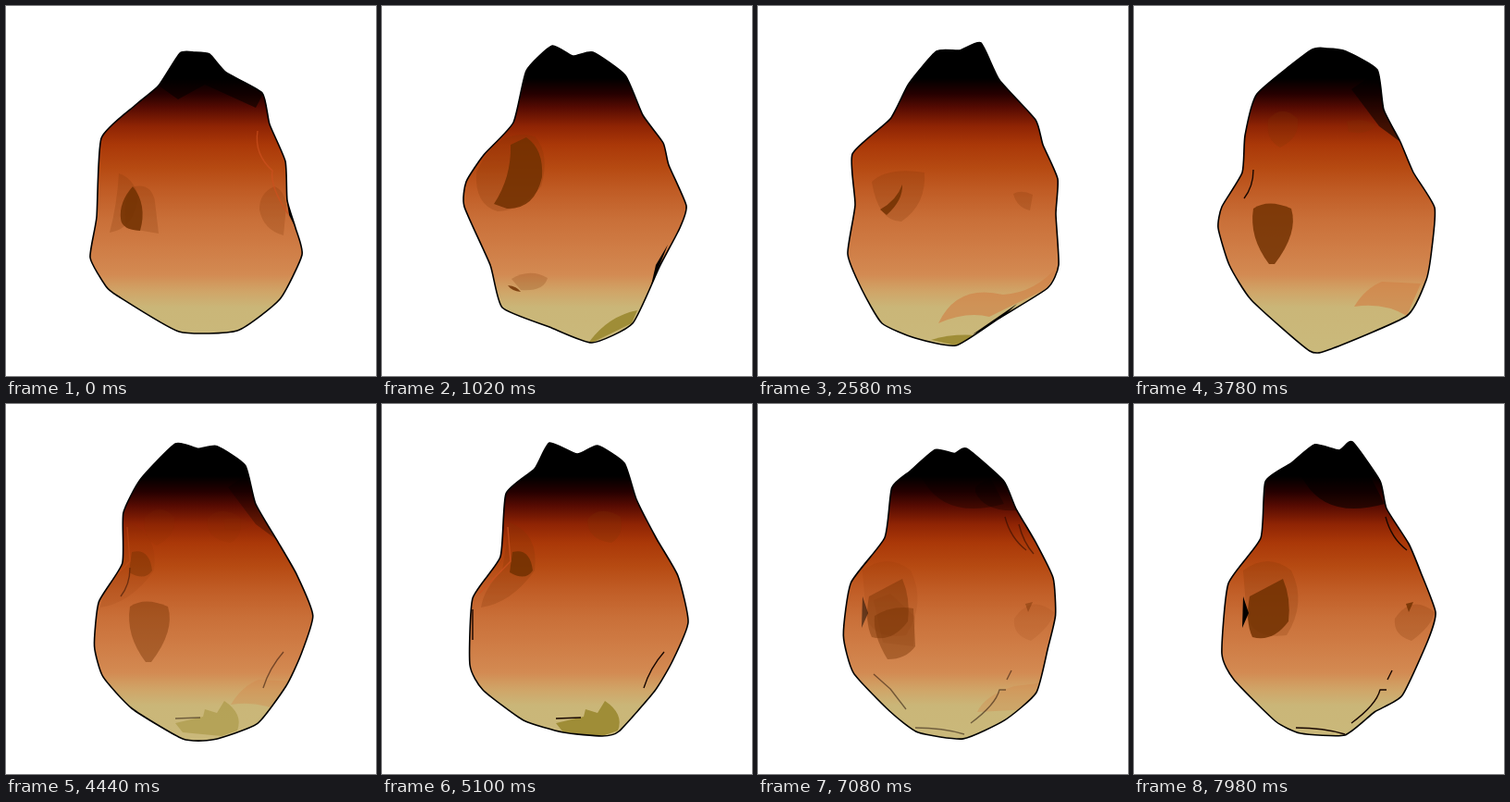
An HTML page with a canvas that plays this animation: 400x400 px, repeating every 8 s.

```html
<!DOCTYPE html>
<html lang="en">
<head>
<meta charset="utf-8">
<title>Turning stone</title>
<style>
  html, body { margin: 0; width: 100%; height: 100%; overflow: hidden; background: #fff; }
  canvas { display: block; width: 100vmin; height: 100vmin; }
</style>
</head>
<body>
<canvas id="stage" width="400" height="400"></canvas>
<script>
const ctx = document.getElementById('stage').getContext('2d');
const LOOP = 8000, STEP = 60;

const body = ctx.createLinearGradient(0, 0, 0, 400);
[[78, '#000'], [95, '#250000'], [110, '#560b02'], [130, '#8f2404'], [150, '#aa3808'],
 [175, '#b64a12'], [200, '#c05c25'], [230, '#c96f38'], [260, '#cf7c45'], [290, '#d38a52'],
 [308, '#d0a467'], [326, '#cab678'], [372, '#cab97b']]
  .forEach(([y, color]) => body.addColorStop(y / 400, color));

const FILLS = {
  shade: 'rgba(125,50,5,.22)', spot: 'rgba(112,48,0,.82)', cap: 'rgba(0,0,0,.55)',
  facet: 'rgba(210,130,72,.65)', olive: 'rgba(155,137,48,.9)', black: '#050200'
};
const STROKES = { crease: '#180700', glow: 'rgba(205,80,30,.7)' };

// Outlines run clockwise from the left tip of the crown, with matching corners.
const poses = [];
function pose(time, outline, marks) {
  const points = outline.split(' ').map(p => p.split(',').map(Number));
  const paths = marks.map(([kind, d]) => [kind, new Path2D(d)]);
  poses.push({ time, points, paths });
}

pose(0,
  '188,51 204,50 220,52 238,72 277,94 285,128 302,168 304,210 313,240 320,269 296,317 250,351 187,352 120,313 108,303 91,272 98,228 103,143 140,107 165,86', [
  ['cap', 'M165 86L186 101L215 85L270 110L278 95L222 52L188 51Z'],
  ['shade', 'M122 181Q136 185 143 204Q140 240 112 245Q120 215 122 181'],
  ['shade', 'M139 195Q158 192 161 212L165 246L130 240Q125 205 139 195'],
  ['spot', 'M137 195Q153 215 145 243Q125 242 124 230Q122 212 137 195'],
  ['shade', 'M290 195Q274 202 274 220Q278 242 300 248L303 215Q300 198 290 195'],
  ['black', 'M303 206L315 244L306 226Z'],
  ['glow', 'M272 135Q268 160 288 178Q285 195 305 225']
]);
pose(1020,
  '184,43 206,54 228,50 263,75 282,118 304,148 310,172 329,216 322,240 300,282 271,343 227,364 181,347 130,326 117,280 89,217 91,190 110,161 142,126 156,70', [
  ['shade', 'M165 141Q182 160 172 195Q150 222 125 222Q100 215 102 180Q125 130 165 141'],
  ['spot', 'M139 150L156 142Q175 155 173 185Q165 220 135 219L121 214Q140 185 139 150'],
  ['black', 'M309 258L290 306L296 280Z'],
  ['olive', 'M224 363Q245 335 276 329L270 343L227 364Z'],
  ['shade', 'M140 295Q160 283 179 294Q175 309 150 307Z'],
  ['spot', 'M136 302Q146 303 150 309Q140 308 136 302']
]);
pose(2580,
  '193,49 218,48 241,40 261,80 300,123 308,150 324,187 322,225 325,280 313,305 260,338 214,367 170,359 134,343 112,306 97,268 105,215 102,160 143,122 163,84', [
  ['shade', 'M123 190Q140 174 180 180Q182 215 155 233Q130 233 123 190'],
  ['spot', 'M156 193Q157 210 139 226L132 220Q150 210 156 193'],
  ['shade', 'M276 203Q285 198 297 204L294 221Q280 218 276 203'],
  ['facet', 'M195 343Q215 300 265 312Q300 310 325 280L313 305L250 336Q225 330 195 343'],
  ['olive', 'M187 361Q210 354 236 356L214 367Z'],
  ['black', 'M232 355L280 322L255 345Z']
]);
pose(3780,
  '191,48 209,46 229,49 263,69 270,112 288,147 302,180 325,218 322,262 316,296 295,335 215,370 190,373 127,318 103,280 91,240 95,217 117,180 120,140 133,95', [
  ['cap', 'M235 90L264 70L288 147L265 130Z'],
  ['shade', 'M145 123Q160 105 177 122Q180 142 158 153Q142 145 145 123'],
  ['shade', 'M230 125Q250 120 262 130Q250 140 232 136Z'],
  ['spot', 'M129 219Q145 208 170 219Q178 245 152 279L146 279Q124 250 129 219'],
  ['crease', 'M129 177Q129 195 119 208'],
  ['facet', 'M238 325Q250 305 268 298L310 300L295 335Q270 320 238 325']
]);
pose(5100,
  '181,42 211,54 233,45 262,64 275,103 297,146 320,186 331,236 314,278 295,310 256,354 238,359 196,355 153,342 109,309 95,282 98,210 128,165 134,97 165,70', [
  ['shade', 'M222 125Q235 108 258 122Q262 142 248 150Q222 147 222 125'],
  ['shade', 'M138 128Q170 140 165 180Q140 215 107 220Q110 200 130 180Z'],
  ['spot', 'M141 160Q160 155 163 180Q155 192 138 182Z'],
  ['glow', 'M136 133L139 170L105 205'],
  ['olive', 'M188 345L218 338L220 330L233 334L241 321Q262 335 255 353L238 359L196 355Z'],
  ['crease', 'M188 340L215 339M305 268Q290 285 283 307M98 222V255']
]);
pose(6180,
  '194,51 208,53 221,52 265,82 279,113 295,149 326,198 322,235 317,275 316,312 271,350 211,362 163,351 135,320 106,284 94,232 96,194 129,143 145,95 160,78', [
  ['cap', 'M230 90Q245 75 270 85L278 115Q240 118 230 95'],
  ['shade', 'M120 212L138 205L165 230L163 262L130 258Z'],
  ['spot', 'M121 229Q140 217 163 221L165 262Q155 276 135 276Q119 250 121 229'],
  ['crease', 'M120 292L138 308L155 330M277 130Q282 150 293 162'],
  ['facet', 'M232 333Q240 315 272 305L315 300L316 312L290 330Z']
]);
pose(7980,
  '195,44 222,50 236,41 266,83 273,113 297,151 310,182 326,225 318,255 290,315 260,333 228,358 180,356 153,343 108,298 95,270 102,194 137,145 142,84 170,64', [
  ['cap', 'M170 64L195 44L236 41L271 108Q210 125 185 85Z'],
  ['shade', 'M118 180Q145 160 170 180Q187 215 165 250Q130 255 122 230Z'],
  ['spot', 'M125 208L161 189Q170 210 167 235Q150 258 128 252Q120 235 125 208'],
  ['black', 'M118 208L124 226L117 242Z'],
  ['shade', 'M282 232Q300 205 325 225Q322 240 300 256Q280 250 282 232'],
  ['spot', 'M294 216L302 214L297 225Z'],
  ['crease', 'M272 122Q278 145 295 158M273 309H266Q262 325 235 345M279 288L274 298M175 350Q205 350 228 357']
]);

// Closed curve through the points, only slightly rounded between corners.
function outlinePath(points) {
  const path = new Path2D(), n = points.length, bend = 0.09;
  const at = i => points[(i + n) % n];
  path.moveTo(...at(0));
  for (let i = 0; i < n; i++) {
    const [a, b, c, d] = [at(i - 1), at(i), at(i + 1), at(i + 2)];
    path.bezierCurveTo(
      b[0] + (c[0] - a[0]) * bend, b[1] + (c[1] - a[1]) * bend,
      c[0] - (d[0] - b[0]) * bend, c[1] - (d[1] - b[1]) * bend, ...c);
  }
  path.closePath();
  return path;
}

function drawMarks(paths, opacity, shift) {
  if (opacity <= 0) return;
  ctx.save();
  ctx.globalAlpha = opacity;
  ctx.translate(shift, 0);
  ctx.lineWidth = 1.4;
  for (const [kind, path] of paths) {
    if (FILLS[kind]) {
      ctx.fillStyle = FILLS[kind];
      ctx.fill(path);
    } else {
      ctx.strokeStyle = STROKES[kind];
      ctx.stroke(path);
    }
  }
  ctx.restore();
}

function draw(time) {
  let i = 0;
  while (i < poses.length - 2 && time >= poses[i + 1].time) i++;
  const from = poses[i], to = poses[i + 1];
  const u = (time - from.time) / (to.time - from.time);
  const ease = u * u * (3 - 2 * u);
  const sway = 4 * Math.sin(Math.PI * u);
  const points = from.points.map(([x, y], k) => {
    const [x2, y2] = to.points[k];
    return [
      x + (x2 - x) * ease + sway * Math.sin(y / 40 + time / 130),
      y + (y2 - y) * ease + sway * 0.5 * Math.sin(x / 50 + time / 170)
    ];
  });
  const outline = outlinePath(points);

  ctx.clearRect(0, 0, 400, 400);
  ctx.fillStyle = body;
  ctx.fill(outline);
  ctx.save();
  ctx.clip(outline);
  drawMarks(from.paths, 1 - ease, 10 * ease);
  drawMarks(to.paths, ease, 10 * (ease - 1));
  ctx.restore();
  ctx.strokeStyle = '#000';
  ctx.lineWidth = 1.6;
  ctx.lineJoin = 'round';
  ctx.stroke(outline);
}

const start = performance.now();
function tick() {
  const time = (performance.now() - start) % LOOP;
  draw(Math.floor(time / STEP) * STEP);
  requestAnimationFrame(tick);
}
tick();
</script>
</body>
</html>
```
